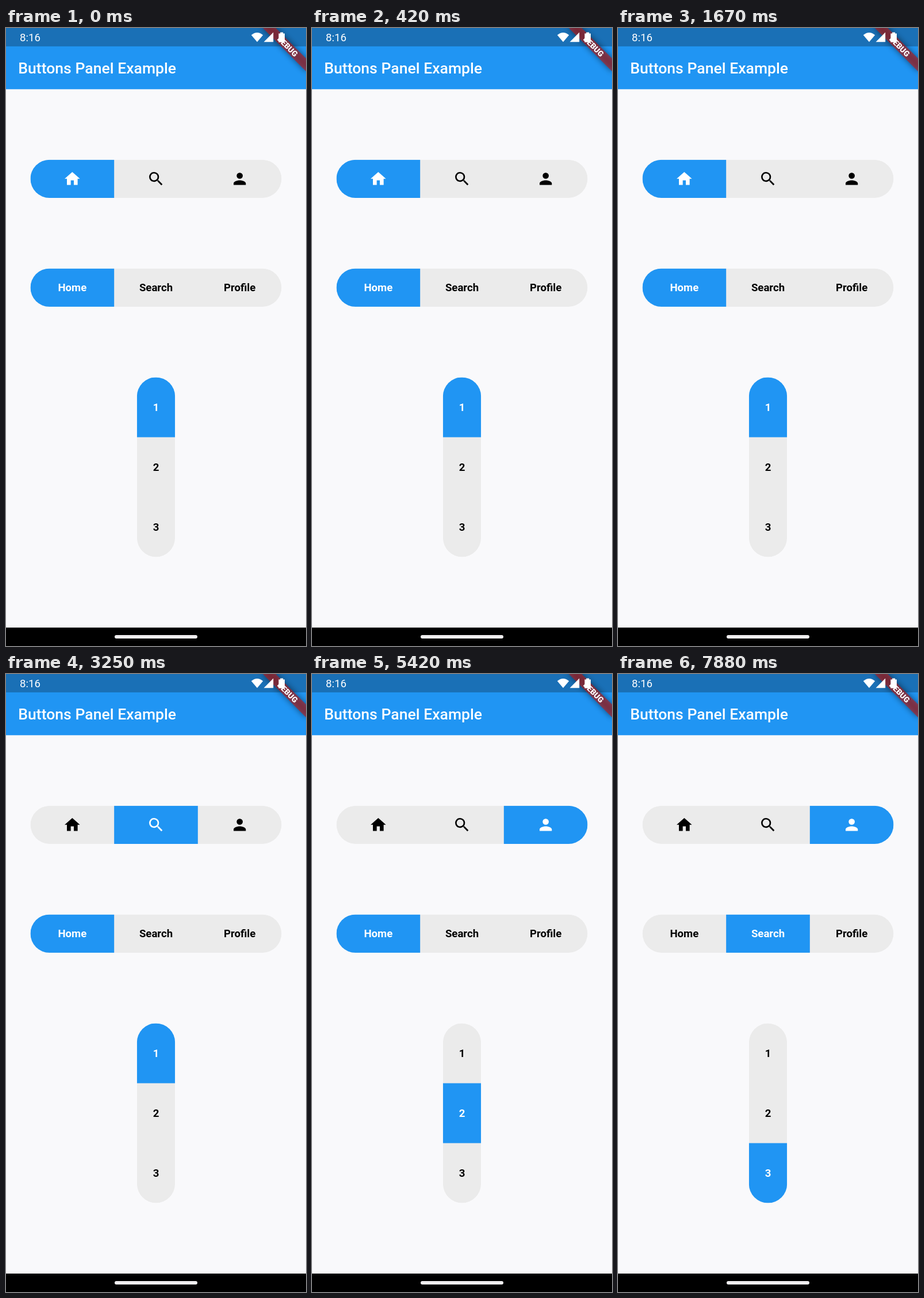
Recreate the animation shown at these times as an HTML page. Size 522 by 1073 pixels, loop 8 s.

```html
<!DOCTYPE html>
<html lang="en">
<head>
<meta charset="utf-8">
<title>Buttons Panel Example</title>
<style>
  html, body { margin: 0; width: 100%; height: 100%; overflow: hidden; }
  svg { display: block; width: 100%; height: 100%; background: #f9f9fb; font-family: Roboto, sans-serif; }
  .panel text { font-size: 18.6px; font-weight: 700; text-anchor: middle; }
  .cell { color: #000; fill: #000; }
  .cell rect { fill: none; }
  .cell.on { fill: #fff; }
  .cell.on rect { fill: #2095f3; }
</style>
</head>
<body>
<svg id="stage" viewBox="0 0 522 1073">
  <defs>
    <filter id="blur" x="-30%" y="-150%" width="160%" height="400%"><feGaussianBlur stdDeviation="3.9"/></filter>
  </defs>

  <rect width="522" height="106.3" fill="#2095f3"/>
  <rect width="522" height="31.9" fill="#1a70b6"/>
  <text x="21.3" y="79.4" font-size="26.58" font-weight="500" fill="#fff">Buttons Panel Example</text>

  <g id="panels"></g>

  <g transform="translate(522 0) rotate(45) scale(1.329)">
    <rect x="-40" y="28" width="80" height="12" opacity=".5" filter="url(#blur)"/>
    <rect x="-40" y="28" width="80" height="12" fill="#b71c1c" fill-opacity=".627"/>
    <text y="37.6" font-size="10.2" font-weight="900" text-anchor="middle" fill="#fff">DEBUG</text>
  </g>

  <g fill="#fff">
    <text x="24" y="23.4" font-size="18.6">8:16</text>
    <path d="M426.8 12.2Q437 3.6 447.2 12.2L437 24.2Z"/>
    <path d="M448.6 24.2L465.2 7.6V24.2Z"/>
    <path d="M477.2 7.6h5v2h2.8v15.2h-10.6v-15.2h2.8z"/>
  </g>

  <rect y="1041" width="522" height="32"/>
  <rect x="189" y="1054" width="144" height="6" rx="3" fill="#f1eff1"/>
</svg>

<script>
const LOOP = 8000;
const ICON_SCALE = 1.329;
const icons = {
  home: "M10 20v-6h4v6h5v-8h3L12 3 2 12h3v8z",
  search: "M15.5 14h-.79l-.28-.27A6.47 6.47 0 0 0 16 9.5 6.5 6.5 0 1 0 9.5 16c1.61 0 3.09-.59 4.23-1.57l.27.28v.79l5 4.99L20.49 19zm-6 0a4.5 4.5 0 1 1 0-9 4.5 4.5 0 0 1 0 9z",
  person: "M12 12a4 4 0 1 0 0-8 4 4 0 0 0 0 8zm0 2c-2.67 0-8 1.34-8 4v2h16v-2c0-2.66-5.33-4-8-4z"
};

// Each tap is [time, selected index].
const panels = [
  { x: 42.5, y: 228.7, w: 437, h: 66.3, icons: true, items: ["home", "search", "person"], taps: [[2670, 1], [3750, 2]] },
  { x: 42.5, y: 417.6, w: 437, h: 66.3, items: ["Home", "Search", "Profile"], taps: [[7150, 1]] },
  { x: 227.8, y: 606.5, w: 66.4, h: 312, vertical: true, items: ["1", "2", "3"], taps: [[4900, 1], [6150, 2]] }
];

function cellMarkup(panel, item, i) {
  const w = panel.vertical ? panel.w : panel.w / 3;
  const h = panel.vertical ? panel.h / 3 : panel.h;
  const x = panel.x + (panel.vertical ? 0 : i * w);
  const y = panel.y + (panel.vertical ? i * h : 0);
  const cx = x + w / 2, cy = y + h / 2;
  const label = panel.icons
    ? `<path transform="translate(${cx} ${cy}) scale(${ICON_SCALE}) translate(-12 -12)" d="${icons[item]}"/>`
    : `<text x="${cx}" y="${cy + 6.6}">${item}</text>`;
  return `<g class="cell"><rect x="${x}" y="${y}" width="${w}" height="${h}"/>${label}</g>`;
}

function panelMarkup(panel, n) {
  const { x, y, w, h } = panel;
  const shape = `<rect x="${x}" y="${y}" width="${w}" height="${h}" rx="${Math.min(w, h) / 2}"`;
  return `<clipPath id="clip${n}">${shape}/></clipPath>
    <g class="panel" clip-path="url(#clip${n})">${shape} fill="#ebebeb"/>
    ${panel.items.map((item, i) => cellMarkup(panel, item, i)).join("")}</g>`;
}

const root = document.getElementById("panels");
root.innerHTML = panels.map(panelMarkup).join("");
const groups = [...root.querySelectorAll(".panel")].map(g => [...g.querySelectorAll(".cell")]);

function draw(now) {
  const t = now % LOOP;
  panels.forEach((panel, n) => {
    const selected = panel.taps.reduce((index, [time, next]) => t >= time ? next : index, 0);
    groups[n].forEach((cell, i) => cell.classList.toggle("on", i === selected));
  });
}

const start = performance.now();
function tick() {
  draw(performance.now() - start);
  requestAnimationFrame(tick);
}
tick();
</script>
</body>
</html>
```
